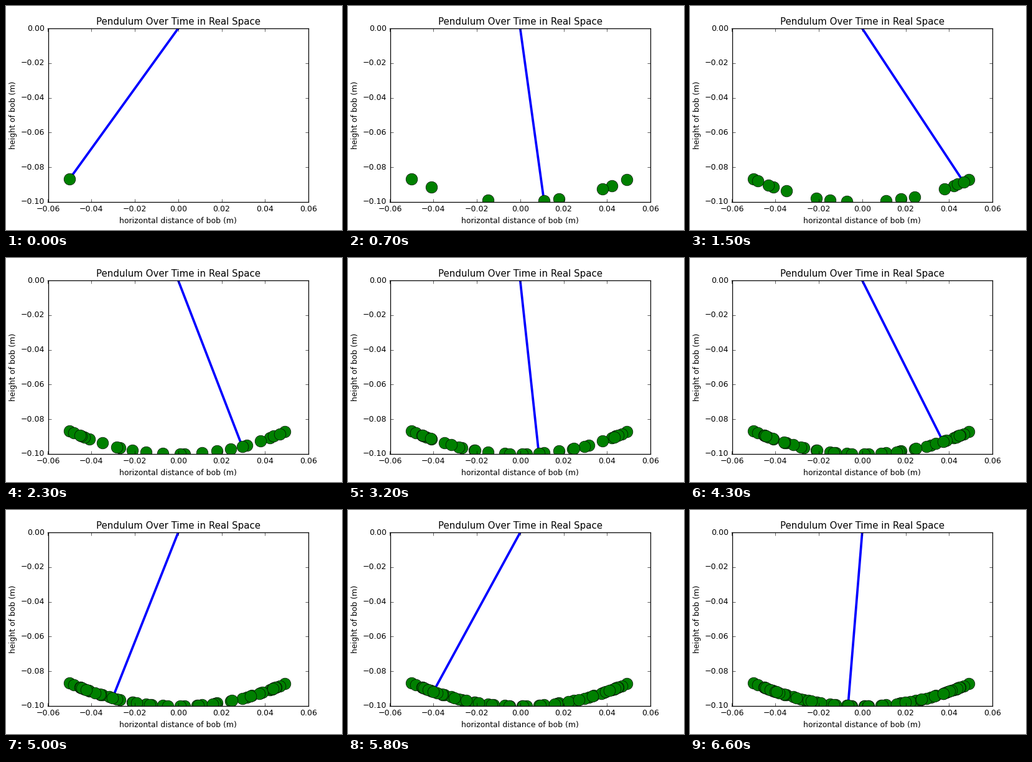
Write a matplotlib script that moves like this. It is 540x360 px and loops after 6700 ms.

```python
import numpy as np
import matplotlib.pyplot as plt
from matplotlib.animation import FuncAnimation

FRAMES, INTERVAL = 67, 100
GRAVITY, LENGTH, DAMPING = 9.81, 0.1, 0.1
STEP, SUBSTEPS = 0.06604, 20

plt.style.use("classic")
plt.rcParams.update({
    "font.family": "DejaVu Sans",
    "font.size": 10,
    "figure.facecolor": "white",
    "figure.subplot.bottom": 0.125,
    "savefig.dpi": "figure",
})


def slope(state):
    theta, omega = state
    return np.array([omega, -GRAVITY / LENGTH * np.sin(theta) - DAMPING * omega])


def rk4(state, h):
    k1 = slope(state)
    k2 = slope(state + h / 2 * k1)
    k3 = slope(state + h / 2 * k2)
    k4 = slope(state + h * k3)
    return state + h / 6 * (k1 + 2 * k2 + 2 * k3 + k4)


def swing():
    """Angle of the damped pendulum at every frame."""
    state = np.array([-np.pi / 6, 0.0])
    angles = []
    for _ in range(FRAMES):
        angles.append(state[0])
        for _ in range(SUBSTEPS):
            state = rk4(state, STEP / SUBSTEPS)
    return np.array(angles)


theta = swing()
bob_x, bob_y = LENGTH * np.sin(theta), -LENGTH * np.cos(theta)

fig, ax = plt.subplots(figsize=(6, 4), dpi=90)
ax.set_xlim(-0.06, 0.06)
ax.set_ylim(-0.10, 0.0)
ax.set_title("Pendulum Over Time in Real Space")
ax.set_xlabel("horizontal distance of bob (m)")
ax.set_ylabel("height of bob (m)")

rod, = ax.plot([], [], "b-", lw=3)
bobs, = ax.plot([], [], "go", ms=15)


def draw(i):
    rod.set_data([0, bob_x[i]], [0, bob_y[i]])
    bobs.set_data(bob_x[:i + 1], bob_y[:i + 1])
    return rod, bobs


anim = FuncAnimation(fig, draw, frames=FRAMES, interval=INTERVAL,
                     repeat=True, repeat_delay=0)
plt.show()
```
